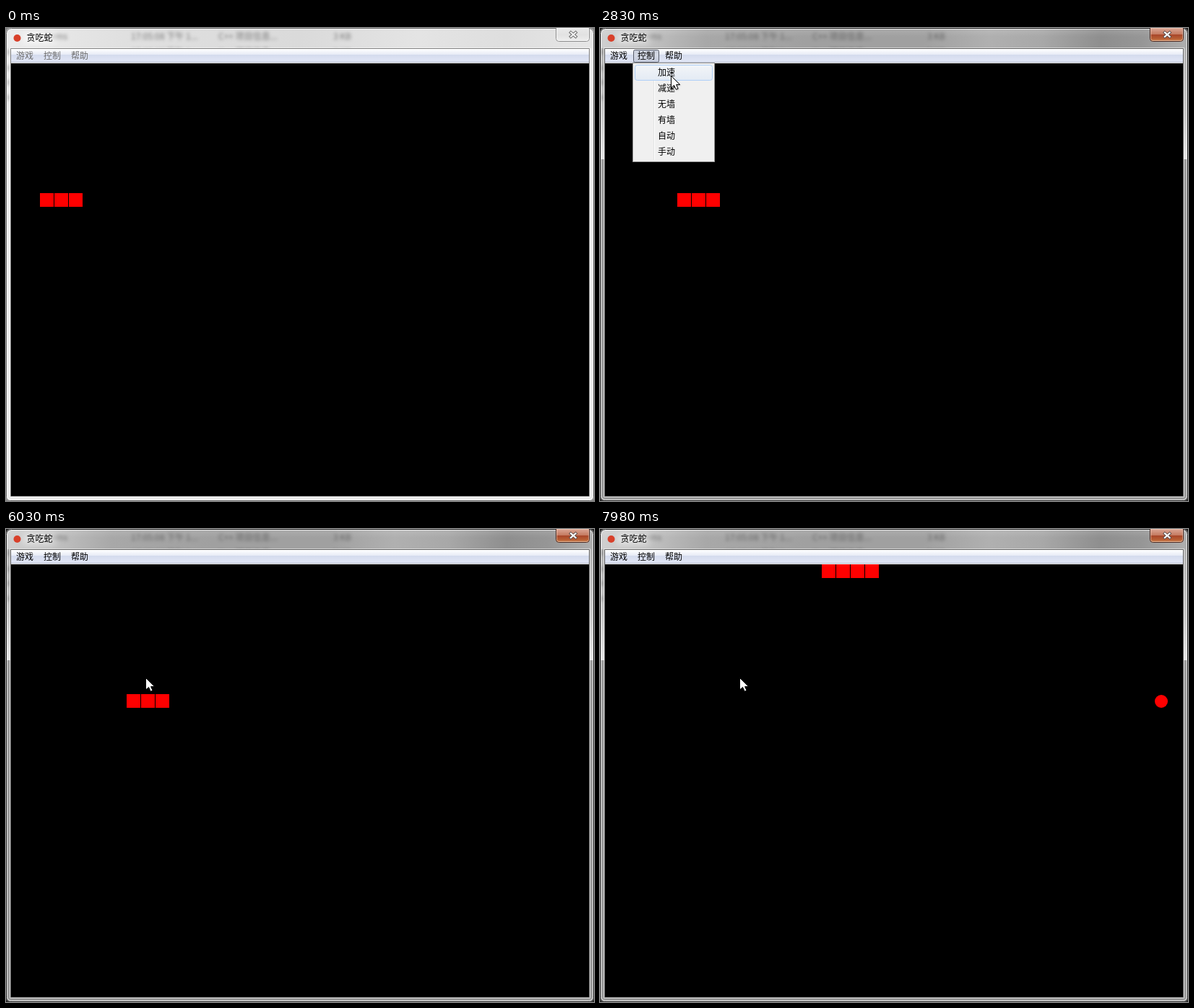
Animation of 814x656 px, one loop 8 s. Source, as an HTML page with a canvas:

```html
<!DOCTYPE html>
<html lang="zh-CN">
<head>
<meta charset="utf-8">
<title>贪吃蛇</title>
<style>
html, body { margin: 0; width: 100%; height: 100%; overflow: hidden; background: #000; }
canvas { display: block; }
</style>
</head>
<body>
<canvas id="stage" width="814" height="656"></canvas>
<script>
const W = 814, H = 656, LOOP = 8000;
const FONT = '12px "Noto Sans CJK SC", "Noto Sans CJK", sans-serif';
const ctx = document.getElementById('stage').getContext('2d');

// Bursts of screen updates: first time, last time, count
const BURSTS = [
  [0, 0, 1], [200, 1200, 10], [1370, 1670, 4], [1820, 1820, 1], [2300, 2830, 6],
  [3240, 3940, 7], [4240, 4410, 2], [4640, 5190, 6], [5580, 6030, 5],
  [6280, 6580, 4], [6730, 6980, 3], [7060, 7760, 7], [7910, 7980, 2]
];
const ticks = BURSTS.flatMap(([a, b, n]) =>
  Array.from({ length: n }, (_, i) => n > 1 ? a + (b - a) * i / (n - 1) : a));

// Pointer keys: time, x, y
const POINTER = [
  [200, 632, 631], [700, 330, 300], [1200, 72, 54], [1370, 66, 46], [1470, 60, 39],
  [2200, 60, 39], [2830, 98, 66], [3140, 98, 66], [3940, 105, 168], [4240, 103, 160],
  [4410, 101, 153], [4640, 101, 153], [5190, 103, 152], [5580, 103, 152], [6030, 193, 206]
];
const ITEMS = ['加速', '减速', '无墙', '有墙', '自动', '手动'];

function gradient(g, x0, y0, x1, y1, stops) {
  const fill = g.createLinearGradient(x0, y0, x1, y1);
  stops.forEach(([p, c]) => fill.addColorStop(p, c));
  return fill;
}

function rect(g, x, y, w, h, fill) {
  g.fillStyle = fill;
  g.fillRect(x, y, w, h);
}

function box(g, x, y, w, h, r, fill, stroke) {
  g.beginPath();
  g.roundRect(x + .5, y + .5, w - 1, h - 1, r);
  if (fill) { g.fillStyle = fill; g.fill(); }
  if (stroke) { g.strokeStyle = stroke; g.lineWidth = 1; g.stroke(); }
}

function text(g, s, x, y, color) {
  g.font = FONT;
  g.fillStyle = color;
  g.fillText(s, x, y);
}

function closeButton(g, active) {
  const fill = active
    ? gradient(g, 0, 0, 0, 19, [[0, '#dca796'], [.46, '#c47a60'], [.5, '#a9472a'], [.8, '#b86035'], [1, '#d99a65']])
    : gradient(g, 0, 0, 0, 19, [[0, '#e9e9e9'], [.5, '#e2e2e2'], [1, '#eeeeee']]);
  box(g, 761, -1, 47, 20, [0, 0, 4, 4], fill, active ? '#4a2820' : '#8c8c8c');
  box(g, 762, 0, 45, 18, [0, 0, 3, 3], null, active ? 'rgba(255,220,200,.55)' : 'rgba(255,255,255,.7)');
  const cross = (color, width) => {
    g.strokeStyle = color;
    g.lineWidth = width;
    g.beginPath();
    g.moveTo(781.9, 6.2); g.lineTo(788.6, 12);
    g.moveTo(788.6, 6.2); g.lineTo(781.9, 12);
    g.stroke();
  };
  g.lineCap = 'square';
  cross(active ? '#5a4a48' : '#666', 4);
  cross(active ? '#fff' : '#f2f2f2', 2.2);
  g.lineCap = 'butt';
}

function backdropText(g, active) {
  g.save();
  g.beginPath();
  g.rect(1, 1, W - 2, 27);
  g.clip();
  g.filter = 'blur(2px)';
  const ink = active ? 'rgba(40,40,40,.5)' : 'rgba(60,60,60,.62)';
  for (const y of [16, 38]) {
    text(g, '17:05:08 下午 1...', 173, y, ink);
    text(g, 'C++ 项目信息...', 294, y, ink);
    text(g, '3 KB', 453, y, ink);
  }
  text(g, 'items', 54, 16, ink);
  g.restore();
  g.save();
  g.filter = 'blur(2px)';
  for (const y of [33, 55, 75, 96]) rect(g, 0, y - 3, 4, 7, 'rgba(60,60,60,.35)');
  g.restore();
}

function drawWindow(active) {
  const layer = document.createElement('canvas');
  layer.width = W;
  layer.height = H;
  const g = layer.getContext('2d');
  rect(g, 0, 0, W, H, active ? '#1e1e1e' : '#808080');
  g.save();
  g.beginPath();
  g.roundRect(0, 0, W, H, [7, 7, 5, 5]);
  g.clip();
  if (active) {
    rect(g, 0, 0, W, H, '#9c9c9c');
    rect(g, 0, 28, W, 154, gradient(g, 0, 28, 0, 182, [[0, '#b4b4b4'], [.6, '#c8c8c8'], [1, '#e6e6e6']]));
    rect(g, 0, 0, W, 28, gradient(g, 0, 0, W, 50, [
      [0, '#d0d0d0'], [.08, '#c2c2c2'], [.18, '#a8a8a8'], [.35, '#a0a0a0'], [.55, '#a0a0a0'],
      [.66, '#b0b0b0'], [.75, '#a8a8a8'], [.85, '#8e8e8e'], [.92, '#969696'], [1, '#b0b0b0']]));
    rect(g, 0, 0, W, 12, gradient(g, 0, 0, 0, 12, [[0, 'rgba(255,255,255,.15)'], [1, 'rgba(255,255,255,0)']]));
  } else {
    rect(g, 0, 0, W, H, '#ebebeb');
    rect(g, 0, 0, W, 28, gradient(g, 0, 0, W, 50, [
      [0, '#ececec'], [.2, '#e0e0e0'], [.5, '#dadada'], [.7, '#e4e4e4'], [.85, '#dedede'], [1, '#e6e6e6']]));
  }
  backdropText(g, active);
  g.restore();
  box(g, 1, 1, W - 2, H - 2, 6, null, 'rgba(255,255,255,.75)');
  box(g, 0, 0, W, H, [7, 7, 5, 5], null, active ? '#1e1e1e' : '#666');
  box(g, 5, 27, 804, 624, 0, null, 'rgba(255,255,255,.55)');
  box(g, 6, 28, 802, 622, 0, null, active ? '#606060' : '#808080');

  // Title
  g.save();
  g.filter = 'blur(5px)';
  rect(g, 24, 7, 44, 14, active ? 'rgba(255,255,255,.55)' : 'rgba(255,255,255,.7)');
  g.restore();
  g.fillStyle = '#d8402a';
  g.beginPath();
  g.arc(15.5, 14, 5, 0, 7);
  g.fill();
  text(g, '贪吃蛇', 28.5, 18, '#000');
  closeButton(g, active);

  // Menu bar and board
  rect(g, 7, 29, 800, 20, gradient(g, 0, 29, 0, 47, [
    [0, '#ffffff'], [.44, '#e7ebf6'], [.45, '#d4dbed'], [1, '#e1e6f6']]));
  rect(g, 7, 47, 800, 1, '#b6bccc');
  rect(g, 7, 48, 800, 1, '#f0f0f0');
  rect(g, 7, 49, 800, 600, '#000');
  return layer;
}

const layers = [drawWindow(false), drawWindow(true)];

function pointerAt(t) {
  if (t < POINTER[0][0]) return null;
  const i = POINTER.findIndex(k => k[0] > t);
  if (i < 0) return POINTER[POINTER.length - 1].slice(1);
  const [t0, x0, y0] = POINTER[i - 1], [t1, x1, y1] = POINTER[i];
  const p = (t - t0) / (t1 - t0);
  return [Math.round(x0 + (x1 - x0) * p), Math.round(y0 + (y1 - y0) * p)];
}

// Head position along the route; 0 is where automatic play begins
function headAt(t) {
  if (t <= 6180) return Math.min(6, Math.max(0, Math.floor((t - 440) / 950) + 1)) - 6;
  const k = t < 6980 ? (t - 6180) * 17 / 800 : 17 + (t - 6980) / 50;
  return Math.floor(k + 1e-6);
}

function cellAt(i) {
  if (i <= 0) return [10 + i, 9];
  if (i <= 11) return [11 - i, 8];
  if (i <= 19) return [0, 19 - i];
  return [i - 19, 0];
}

function drawSnake(t) {
  const head = headAt(t);
  const size = head > 19 ? 4 : 3;
  for (let j = 0; j < size; j++) {
    const [c, r] = cellAt(head - j);
    rect(ctx, 7 + c * 20, 49 + r * 20, 19, 19, '#f00');
  }
  if (head >= 18) {
    ctx.beginPath();
    ctx.arc(777, 239, 9, 0, 7);
    ctx.fill();
  }
}

function drawMenu(hot) {
  rect(ctx, 45, 48, 114, 138, '#979797');
  rect(ctx, 46, 49, 112, 136, '#f0f0f0');
  rect(ctx, 74, 51, 1, 132, '#e2e3e3');
  rect(ctx, 75, 51, 1, 132, '#fff');
  ITEMS.forEach((s, i) => {
    const y = 51 + 22 * i;
    if (i === hot) {
      box(ctx, 48, y, 108, 22, 3, gradient(ctx, 0, y, 0, y + 22, [[0, '#f3f5f8'], [1, '#e3eaf4']]), '#aecff7');
    }
    text(ctx, s, 80, y + 15, '#000');
  });
}

function drawPointer(x, y) {
  ctx.save();
  ctx.translate(x + .5, y + .5);
  ctx.beginPath();
  [[0, 0], [0, 16.5], [4, 12.9], [6.8, 18.8], [9.6, 17.6], [7.1, 12.1], [12.2, 12.1]]
    .forEach(p => ctx.lineTo(...p));
  ctx.closePath();
  ctx.shadowColor = 'rgba(0,0,0,.35)';
  ctx.shadowBlur = 2;
  ctx.shadowOffsetX = ctx.shadowOffsetY = 1;
  ctx.fillStyle = '#fff';
  ctx.fill();
  ctx.shadowColor = 'transparent';
  ctx.strokeStyle = '#000';
  ctx.lineWidth = 1;
  ctx.stroke();
  ctx.restore();
}

function drawHalo(x, y) {
  const fill = ctx.createRadialGradient(x, y + 1, 2, x, y + 1, 11);
  fill.addColorStop(0, 'rgba(255,236,60,.65)');
  fill.addColorStop(1, 'rgba(245,205,60,.6)');
  ctx.fillStyle = fill;
  ctx.beginPath();
  ctx.arc(x, y + 1, 11, 0, 7);
  ctx.fill();
}

function draw(t) {
  const active = t >= 1470;
  const open = t >= 1570 && t < 5690;
  const pressed = (t >= 1470 && t < 1820) || (t >= 5580 && t < 5690);
  const pos = pointerAt(t);
  ctx.drawImage(layers[+active], 0, 0);
  drawSnake(t);
  if (open) {
    box(ctx, 46, 30, 36, 18, 2, gradient(ctx, 0, 30, 0, 48, [[0, '#c4c9d6'], [.4, '#d3d8e4'], [1, '#c3cadc']]), '#565b67');
  }
  ['游戏', '控制', '帮助'].forEach((s, i) => text(ctx, s, 14 + 38 * i, 43, active ? '#000' : '#6d6d6d'));
  if (open) drawMenu(pos[1] >= 51 ? Math.floor((pos[1] - 51) / 22) : -1);
  if (pos) {
    if (pressed) drawHalo(...pos);
    drawPointer(...pos);
  }
}

let shown = -1;
function frame(now) {
  const t = now % LOOP;
  let i = ticks.length - 1;
  while (i > 0 && ticks[i] > t + .01) i--;
  if (i !== shown) {
    shown = i;
    draw(ticks[i]);
  }
  requestAnimationFrame(frame);
}
draw(0);
requestAnimationFrame(frame);
</script>
</body>
</html>
```
